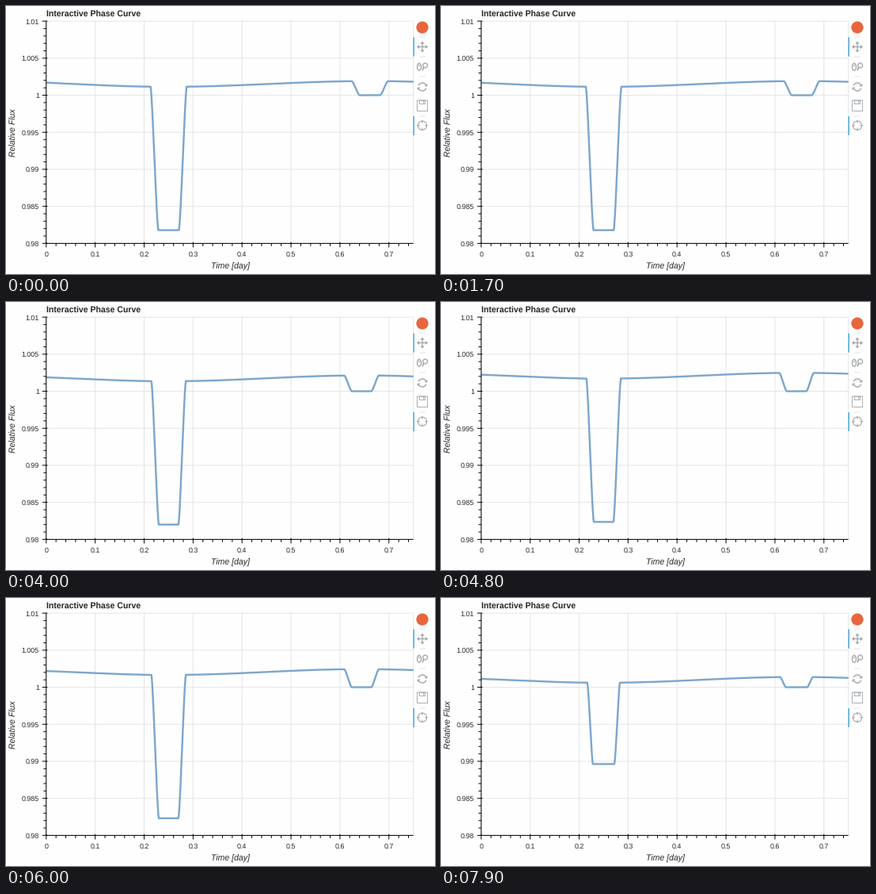
These frames come from a looping animation (542x338 px, 8000 ms). A matplotlib script:

```python
import numpy as np
import matplotlib.pyplot as plt
from matplotlib.animation import FuncAnimation
from matplotlib.patches import Arc, Circle, Ellipse, Polygon, Rectangle

W, H, DPI = 542, 338, 64
PT = 72 / DPI                       # points per pixel
LEFT, RIGHT, TOP, BOTTOM = 50.8, 514.7, 19.1, 299.4
XSCALE = (RIGHT - LEFT) / 0.75      # pixels per day
YSCALE = (BOTTOM - TOP) / 0.03      # pixels per unit of flux
STAR_Y = BOTTOM - 0.02 * YSCALE     # flux of exactly 1
TRANSIT_X = LEFT + 0.25 * XSCALE
PERIOD = 0.8 * XSCALE
INK, LABEL, GRID, ICON = "black", "#262626", "#e5e5e5", "#a1a6a9"

plt.rcParams["font.family"] = "Liberation Sans"
plt.rcParams["text.hinting"] = "none"
plt.rcParams["path.snap"] = False

fig = plt.figure(figsize=(W / DPI, H / DPI), dpi=DPI, facecolor="#fefefe")
ax = fig.add_axes([0, 0, 1, 1])
ax.set_xlim(0, W)
ax.set_ylim(H, 0)
ax.axis("off")


def line(xs, ys, color=INK, width=1, z=2, **kw):
    kw.setdefault("solid_capstyle", "butt")
    return ax.plot(xs, ys, color=color, lw=width * PT, zorder=z, **kw)[0]


def text(x, y, s, size, **kw):
    ax.text(x, y, s, fontsize=size * PT, color=LABEL, **kw)


def draw_axes():
    for i in range(38):
        x = LEFT + 0.02 * i * XSCALE
        major = i % 5 == 0
        if major:
            line([x, x], [TOP, BOTTOM], GRID, 1, 0)
            text(x, 312.6, f"{i * 0.02:.1f}" if i else "0", 8.9,
                 ha="center", va="center_baseline")
        line([x, x], [BOTTOM - 1.6 * major, BOTTOM + (5 if major else 3.4)], z=4)
    for i in range(31):
        y = BOTTOM - 0.001 * i * YSCALE
        major = i % 5 == 0
        if major:
            line([LEFT, RIGHT], [y, y], GRID, 1, 0)
            text(42, y + 0.1, f"{0.98 + i * 0.001:.3f}".rstrip("0").rstrip("."),
                 8.9, ha="right", va="center_baseline")
        line([LEFT - (5 if major else 3.4), LEFT + 1.6 * major], [y, y], z=4)
    line([RIGHT, RIGHT], [TOP, BOTTOM], GRID, 1, 0)
    line([LEFT, LEFT], [TOP, BOTTOM + 0.5], z=4)
    line([LEFT, RIGHT], [BOTTOM, BOTTOM], z=4)
    text(51, 14, "Interactive Phase Curve", 10.5, weight="bold", va="baseline")
    text(283.3, 331.5, "Time [day]", 10.5, style="italic", ha="center",
         va="baseline")
    text(10.2, 159.2, "Relative Flux", 10.5, style="italic", rotation=90,
         ha="center", va="center")


def draw_toolbar():
    cx = 526
    add = ax.add_patch
    add(Circle((cx, 27), 7.6, color="#e8663c", lw=0))
    for y in (39, 64, 89, 139):
        line([522, 530], [y, y], GRID, 1)
    for y in (51.5, 151):
        line([515.2, 515.2], [y - 12, y + 12], "#58aede", 1.6, 5)

    # pan
    y = 51.5
    line([cx - 5, cx + 5], [y, y], ICON, 1.3)
    line([cx, cx], [y - 5, y + 5], ICON, 1.3)
    for dx, dy in ((1, 0), (-1, 0), (0, 1), (0, -1)):
        bx, by = cx + 4 * dx, y + 4 * dy
        add(Polygon([(cx + 7 * dx, y + 7 * dy),
                     (bx + 2.6 * dy, by + 2.6 * dx),
                     (bx - 2.6 * dy, by - 2.6 * dx)], color=ICON, lw=0))

    # wheel zoom
    edge = dict(fill=False, ec=ICON, lw=1.3 * PT)
    add(Ellipse((522, 76.8), 5, 9, **edge))
    line([522, 522], [74, 76.5], ICON, 1.1)
    add(Circle((529.6, 75), 2.9, **edge))
    line([527.8, 526], [77.2, 81.3], ICON, 1.6)

    # reset
    y = 102
    for start, side in ((200, 1), (20, -1)):
        add(Arc((cx, y), 10, 10, theta1=start, theta2=start + 130,
                color=ICON, lw=1.4 * PT))
        add(Polygon([(cx + 6.3 * side, y - 4.4 * side),
                     (cx + 6.3 * side, y - 0.6 * side),
                     (cx + 2.6 * side, y - 0.6 * side)], color=ICON, lw=0))

    # save
    edge["lw"] = 0.9 * PT
    add(Rectangle((cx - 6.6, 119), 13.2, 13.4, **edge))
    add(Rectangle((cx - 3.6, 119), 7.2, 4.4, **edge))
    line([cx + 1.6, cx + 1.6], [120, 122.5], ICON, 1.2)

    # crosshair
    y = 150.7
    edge["lw"] = 1.1 * PT
    add(Circle((cx, y), 5.6, **edge))
    for s in (-1, 1):
        line([cx + 3.2 * s, cx + 6.6 * s], [y, y], ICON, 1.1)
        line([cx, cx], [y + 3.2 * s, y + 6.6 * s], ICON, 1.1)


# (time in s, value) keys for the three quantities being dragged
ECLIPSE_X = [(0, 459.7), (0.9, 471.6), (1.4, 456.7), (1.6, 456.7), (2.0, 450),
             (2.2, 450), (2.4, 449.2)]
GLOW = [(3.9, 17.9), (4.0, 19.9), (4.4, 36), (5.15, 12.9), (5.7, 22.9),
        (5.9, 22.9), (6.0, 22.8)]
RADIUS = [(6.4, 1), (6.7, 1.0275), (7.2, 1.0275), (7.9, 0.753)]


def ease(keys, t):
    """Interpolate between keys with a cosine in and out."""
    if t <= keys[0][0]:
        return keys[0][1]
    for (t0, a), (t1, b) in zip(keys, keys[1:]):
        if t <= t1:
            p = (t - t0) / (t1 - t0)
            return a + (b - a) * (1 - np.cos(np.pi * p)) / 2
    return keys[-1][1]


def covered(x, centre, mid, half):
    """Share of the planet's disc that lies inside the star's limb."""
    u = np.clip((np.abs(x - centre) - mid) / half, -1, 1)
    return (np.arccos(u) - u * np.sqrt(1 - u * u)) / np.pi


xs = np.linspace(LEFT, RIGHT, 1900)
orbit = 2 * np.pi * (xs - TRANSIT_X) / PERIOD


def flux_y(t):
    centre, glow, k = (ease(keys, t) for keys in (ECLIPSE_X, GLOW, RADIUS))
    mid = 17.1 + 0.08 * (centre - 449.2)
    half = 4.7 * k * mid / 17.1
    # an eccentric orbit delays the bright side until the eclipse
    delay = 2 * np.pi * (centre - TRANSIT_X) / PERIOD - np.pi
    phase = orbit - delay * (1 - np.cos(orbit)) / 2
    planet = glow * k * k - 7.3 * (1 + np.cos(phase)) / 2
    hidden = covered(xs, centre, mid, half)
    dip = 180.8 * k * k * covered(xs, TRANSIT_X, mid, half)
    return STAR_Y - planet * (1 - hidden) + dip


draw_axes()
draw_toolbar()
curve = line(xs, flux_y(0), "#7ca6ce", 2.4, 3, solid_joinstyle="round")


def update(n):
    curve.set_ydata(flux_y(round(n * 0.1, 3)))
    return (curve,)


anim = FuncAnimation(fig, update, frames=80, interval=100, repeat=True,
                     repeat_delay=0, blit=False)
plt.show()
```
